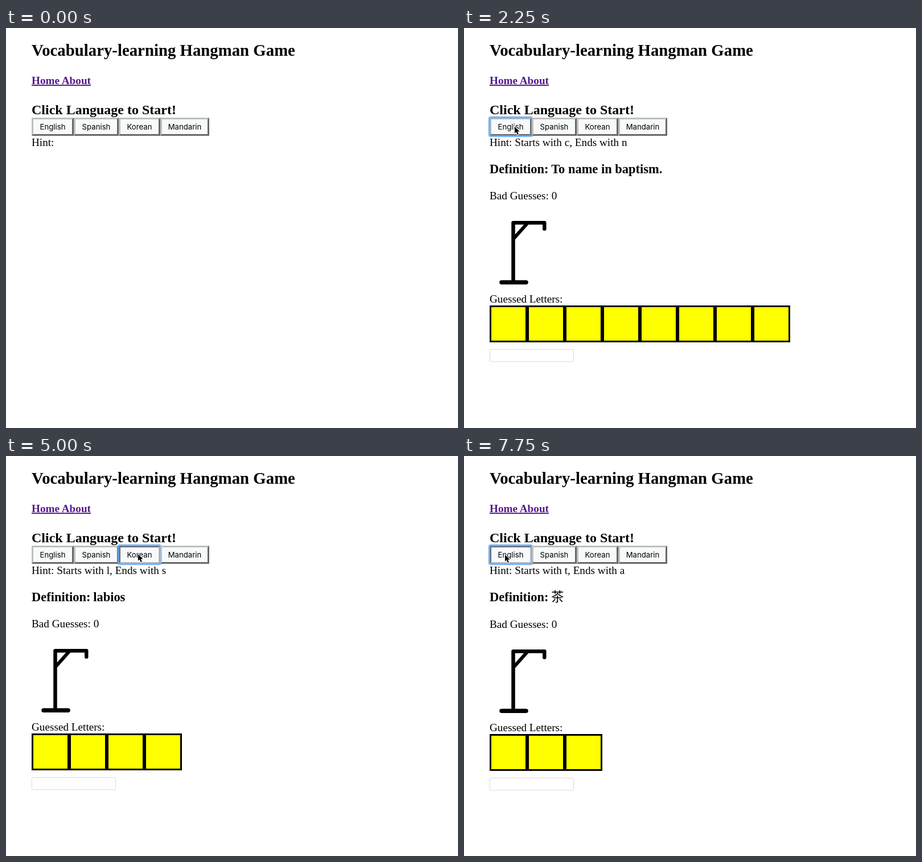
An HTML page that plays this animation: 794 by 705 pixels, repeating every 8 s.

```html
<!DOCTYPE html>
<html lang="en">
<head>
<meta charset="utf-8">
<title>Vocabulary-learning Hangman Game</title>
<style>
  html, body { margin: 0; width: 100%; height: 100%; overflow: hidden; background: #fff; }
  svg { position: absolute; left: 0; top: 0; }
  svg text { font: 19.2px "Liberation Serif", Times, serif; }
  svg .title { font-size: 28.8px; font-weight: bold; }
  svg .link { font-weight: bold; fill: #551a8b; text-decoration: underline; }
  svg .prompt { font-size: 24px; font-weight: bold; }
  svg .def { font-size: 22.46px; font-weight: bold; }
  svg .hangul { font: 24.4px "Noto Sans CJK KR", "Noto Sans CJK SC", sans-serif; }
  svg .hanzi { font: 22.46px "Noto Sans CJK SC", "Noto Sans CJK JP", sans-serif; }

  .button {
    position: absolute; top: 158px; box-sizing: border-box; height: 32px;
    border: 3px solid; border-color: #bfbfbf #686868 #686868 #bfbfbf;
    background: #f7fafa; text-align: center;
    font: 13.2px/26px Inter, "Liberation Sans", sans-serif;
  }
  .button::after {
    content: ""; position: absolute; inset: -5px; opacity: 0;
    border: 3px solid rgba(93, 164, 246, .8); border-radius: 4px;
    box-shadow: 0 0 2px rgba(93, 164, 246, .7), inset 0 0 2px rgba(93, 164, 246, .7);
  }
  .english  { left: 45px;  width: 74px; }
  .spanish  { left: 119px; width: 79px; }
  .korean   { left: 198px; width: 73px; }
  .mandarin { left: 271px; width: 86px; }

  .english, .korean, .button::after, .scene, .board, .shift, .cursor {
    animation: 8s step-end infinite;
  }
  .scene, .board { opacity: 0; }

  .english { animation-name: press-english; }
  .korean { animation-name: press-korean; }
  @keyframes press-english {
    96.875%, 100% { border-color: #686868 #bfbfbf #bfbfbf #686868; }
  }
  @keyframes press-korean {
    62.5% { border-color: #686868 #bfbfbf #bfbfbf #686868; }
    65.625% { border-color: #bfbfbf #686868 #686868 #bfbfbf; }
  }

  .english::after { animation-name: focus-english; }
  .spanish::after { animation-name: focus-spanish; }
  .korean::after { animation-name: focus-korean; }
  .mandarin::after { animation-name: focus-mandarin; }
  @keyframes focus-english { 0%, 46.875% { opacity: 0 } 28.125%, 96.875%, 100% { opacity: 1 } }
  @keyframes focus-spanish { 0%, 62.5% { opacity: 0 } 46.875% { opacity: 1 } }
  @keyframes focus-korean { 0%, 81.25% { opacity: 0 } 62.5% { opacity: 1 } }
  @keyframes focus-mandarin { 0%, 96.875% { opacity: 0 } 81.25% { opacity: 1 } }

  .board { animation-name: board; }
  .shift { animation-name: shift; }
  .scene-english { animation-name: scene-english; }
  .scene-spanish { animation-name: scene-spanish; }
  .scene-korean { animation-name: scene-korean; }
  .scene-mandarin { animation-name: scene-mandarin; }
  @keyframes board { 0% { opacity: 0 } 28.125%, 100% { opacity: 1 } }
  @keyframes shift { 0% { transform: none } 65.625%, 100% { transform: translateY(1px) } }
  @keyframes scene-english { 0%, 46.875% { opacity: 0 } 28.125% { opacity: 1 } }
  @keyframes scene-spanish { 0%, 65.625% { opacity: 0 } 46.875% { opacity: 1 } }
  @keyframes scene-korean { 0%, 81.25% { opacity: 0 } 65.625% { opacity: 1 } }
  @keyframes scene-mandarin { 0% { opacity: 0 } 81.25%, 100% { opacity: 1 } }

  .cursor { animation-name: cursor; }
  @keyframes cursor {
    0% { transform: translate(-40px, 0) }
    3.125% { transform: translate(474px, 141px) }
    6.25% { transform: translate(421px, 139px) }
    9.375% { transform: translate(466px, 154px) }
    15.625% { transform: translate(171px, 174px) }
    18.75% { transform: translate(117px, 173px) }
    21.875% { transform: translate(116px, 174px) }
    25% { transform: translate(89px, 174px) }
    31.25% { transform: translate(129px, 175px) }
    34.375% { transform: translate(162px, 176px) }
    50% { transform: translate(198px, 174px) }
    53.125% { transform: translate(223px, 174px) }
    56.25% { transform: translate(232px, 173px) }
    65.625% { transform: translate(265px, 173px) }
    68.75% { transform: translate(319px, 173px) }
    87.5% { transform: translate(133px, 166px) }
    90.625% { transform: translate(67px, 164px) }
    93.75%, 100% { transform: translate(72px, 174px) }
  }
</style>
</head>
<body>
<svg width="794" height="705">
  <defs>
    <pattern id="cells" x="45" y="489" width="66" height="65" patternUnits="userSpaceOnUse">
      <rect width="66" height="65"/>
      <rect x="3" y="3" width="60" height="59" fill="#ff0"/>
    </pattern>
  </defs>

  <text class="title" x="45" y="49">Vocabulary-learning Hangman Game</text>
  <text class="link" x="45" y="99">Home About</text>
  <text class="prompt" x="45" y="152">Click Language to Start!</text>
  <text x="45" y="208">Hint:</text>

  <g class="board">
    <text class="def" x="45" y="256">Definition:</text>
    <g class="shift">
      <text x="45" y="302">Bad Guesses: 0</text>
      <g fill="none" stroke="#000" stroke-width="6.5" stroke-linejoin="round">
        <path d="M86.5 448V343.2H141.3V354" stroke-linecap="round"/>
        <path d="M87.5 371L111 344.5" stroke-width="6"/>
        <path d="M66 448.3H109" stroke-width="7.5" stroke-linecap="round"/>
      </g>
      <text x="45" y="484">Guessed Letters:</text>
      <rect x="45.5" y="566.5" width="147" height="21.5" rx="1" fill="#fff" stroke="#dcdcdc"/>
    </g>
  </g>

  <g class="scene scene-english">
    <text x="89.3" y="208">Starts with c, Ends with n</text>
    <text class="def" x="153.2" y="256">To name in baptism.</text>
    <rect x="45" y="489" width="528" height="65" fill="url(#cells)"/>
  </g>
  <g class="scene scene-spanish">
    <text x="89.3" y="208">Starts with l, Ends with s</text>
    <text class="def" x="153.2" y="256">labios</text>
    <rect x="45" y="489" width="264" height="65" fill="url(#cells)"/>
  </g>
  <g class="scene scene-korean">
    <text x="89.3" y="208">Starts with d, Ends with e</text>
    <text class="hangul" x="153" y="256" lang="ko">추정하다</text>
    <rect x="45" y="489" width="396" height="65" fill="url(#cells)" transform="translate(0 1)"/>
  </g>
  <g class="scene scene-mandarin">
    <text x="89.3" y="208">Starts with t, Ends with a</text>
    <text class="hanzi" x="153" y="256" lang="zh">茶</text>
    <rect x="45" y="489" width="198" height="65" fill="url(#cells)" transform="translate(0 1)"/>
  </g>
</svg>

<div class="button english">English</div>
<div class="button spanish">Spanish</div>
<div class="button korean">Korean</div>
<div class="button mandarin">Mandarin</div>

<svg width="794" height="705">
  <path class="cursor" d="M0 0V11.8L2.7 9.3 4.8 14 6.9 13.1 4.8 8.5H8.6Z"
        stroke="#fff" stroke-width="1.8" paint-order="stroke"/>
</svg>
</body>
</html>
```
